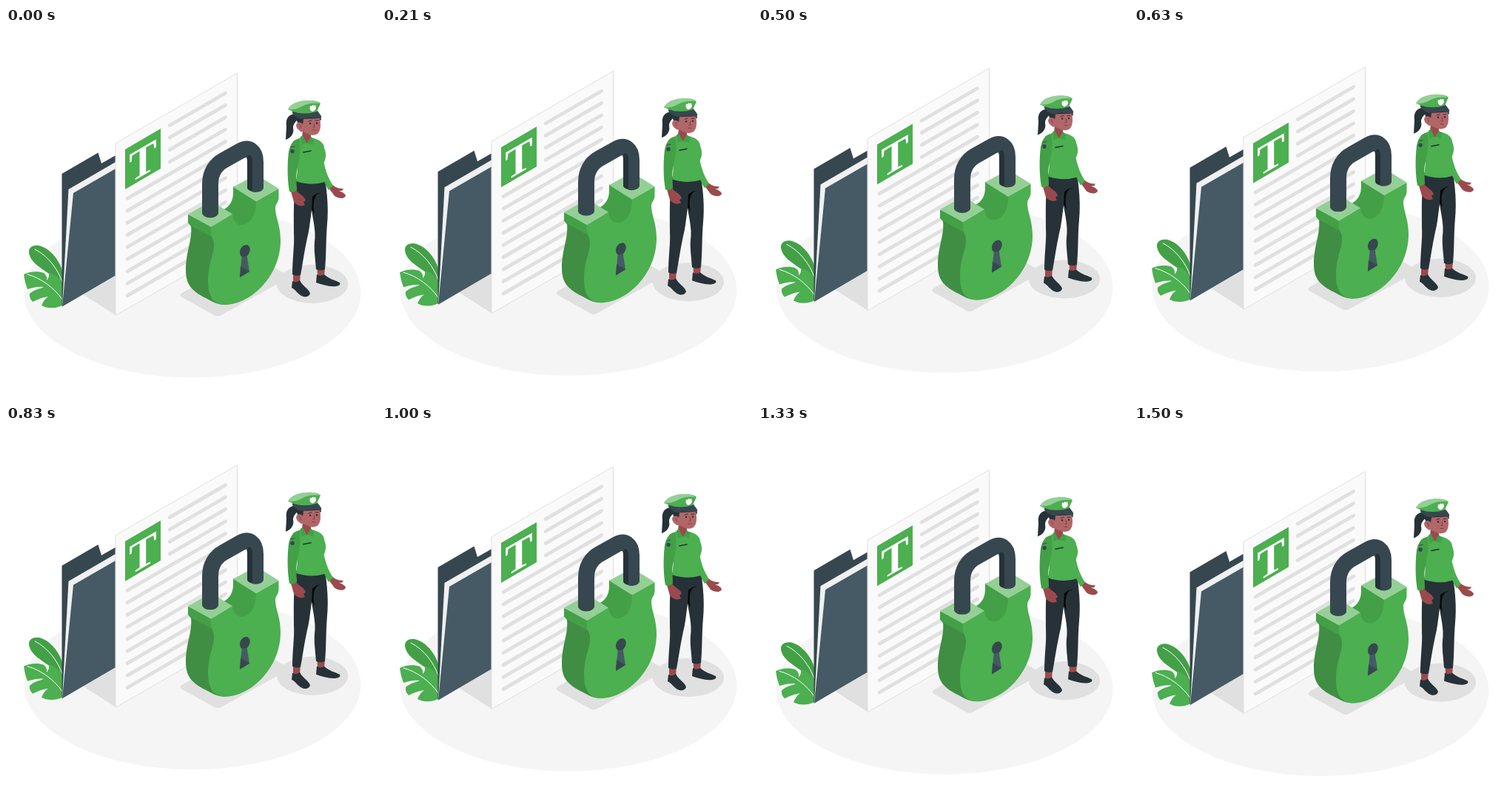
Recreate the animation shown at these times as an HTML page. Size 500x500 px, loop 1.54 s.

```html
<!DOCTYPE html>
<html lang="en">
<head>
<meta charset="utf-8">
<title>Document protection</title>
<style>
  html, body { margin: 0; width: 100%; height: 100%; overflow: hidden; background: #fff; }
  svg { display: block; width: 100%; height: 100%; }
  .green { fill: #4caf50; }
  .mid { fill: #43a047; }
  .deep { fill: #3f8e43; }
  .light { fill: #94cf96; }
  .slate { fill: #37474f; }
  .steel { fill: #455a64; }
  .ink { fill: #263238; }
  .shade { fill: #e0e0e0; }
  .skin { fill: #b16668; }
  .hand { fill: #9a4a4d; }
  .line { fill: none; stroke-linecap: round; stroke-linejoin: round; }
</style>
</head>
<body>
<svg viewBox="0 0 500 500">
<g id="scene">
  <ellipse cx="252" cy="357.5" rx="227.5" ry="115" fill="#f5f5f5"/>
  <g class="shade">
    <path d="M104 360L148 388V330Z"/>
    <path d="M238 358L330 305L379 333Q383 336 379 339L291 388Q286 391 281 388L238 364Q233 361 238 358Z"/>
    <ellipse cx="414" cy="346" rx="48" ry="26"/>
  </g>

  <g id="plant">
    <path class="mid" d="M31 304C30 297 36 293 44 294C60 297 75 317 77 332V348C72 343 66 337 58 332C45 323 33 316 31 304Z"/>
    <path class="green" d="M24 333C31 329 43 328 51 331Q56 335 55 341Q59 337 58 331C66 332 74 339 77 347V374C68 380 55 379 48 375Q51 367 57 363C49 364 42 367 36 370Q31 365 32 359C39 353 47 352 51 350C43 349 36 351 29 353Q25 343 24 333Z"/>
    <path class="line" stroke="#fff" d="M39 299C57 308 70 326 76 343M29 333C48 338 66 352 76 367"/>
  </g>

  <g id="folder">
    <path class="slate" d="M75.500 197L124.500 168.500L129 183L150 171V333L75.500 376Z"/>
    <path fill="#f0f0f0" d="M84.500 218L150 180V330L76 376Z"/>
    <path class="steel" d="M91 223L150 189V333L76 376.500Z"/>
  </g>

  <g id="page">
    <path fill="#fafafa" stroke="#e0e0e0" d="M148 156L312.500 61V294L148 388.500Z"/>
    <path class="green" d="M161 164L209 136V190L161 218Z"/>
    <text transform="matrix(.95 -.55 0 1 185 199.500)" text-anchor="middle" font-family="'Liberation Serif', serif" font-weight="700" font-size="59" fill="#fff">T</text>
    <path id="rows" class="line" stroke="#e0e0e0" stroke-width="4.800"/>
  </g>

  <g id="lock">
    <path class="deep" d="M246 252L277 269L300 360L296 374C286 374 279 370 270 365C250 355 243 346 243 327C243 302 252 287 250 268L246 263Z"/>
    <path class="mid" d="M246 252L277 268V282L250 267L246 263Z"/>
    <path class="mid" d="M307 214L340 232V260L318 275L304 265L293 246C303 241 307 233 307 222Z"/>
    <path class="green" d="M277 268L306 251.500C307 260 311 267 320 266C332 264 338 251 338 234L368.500 217V230C368 236 364 238 364 243C364 256 371 266 371 287C371 336 330 374 296 374C279 373 273 362 273 342C273 318 281 307 281 293C281 284 277 284 277 278Z"/>
    <path class="light" d="M246 251.500L277 234L306 251.500L277 269ZM307 215L338 198L368.500 217L338 234.500Z"/>
    <path class="line" stroke="#37474f" stroke-width="22" stroke-linecap="butt" style="stroke-linecap:butt" d="M276 251V211C276 196 283 185 294 179L317 166C328 160 337 166 337 181V216"/>
    <path class="ink" d="M326 177Q326 172 330 172Q333 174 333 181V221Q326 219 326 216Z"/>
    <path class="slate" d="M265 250H287A11 6.500 0 0 1 265 250ZM333 215H348A11 6.500 0 0 1 333 221.500Z"/>
    <path class="steel" d="M319 305L316 337L329 329L325 304Z"/>
    <path class="slate" d="M316 337L317 322L329 329Z"/>
    <path class="slate" d="M316 303C316 297 321 293 325 293C330 294 331 300 328 305L326 308L319 309Q316 308 316 303Z"/>
  </g>

  <g id="officer">
    <path class="hand" d="M388 331H398L397 344H388ZM420.500 325H431L430 335H421Z"/>
    <path class="ink" d="M387 342Q392 345 397 341C400 348 410 353 411 359Q409 364 402 363C395 361 392 354 386 351ZM420 333Q425 336 430 333C436 339 445 341 451 344Q453 348 446 349C437 350 428 347 419 344Z"/>
    <path class="ink" d="M392 204H431C434 222 436 245 434 265C432 288 433 307 431 326Q425 329 419 326C418 312 416 300 417 289C419 275 415 260 413 246C411 260 410 273 407 284C403 302 401 318 398 334Q392 336 387 333C387 312 390 293 389 278C389 255 388 230 392 204Z"/>
    <path fill="#050708" d="M426 222Q417 224 414 228L413 245L417 251C414 239 416 230 420 225Z"/>

    <path class="hand" d="M436 216L441 212C446 216 450 217 456 217L454 220L450 220C455 222 459 224 459 227C456 232 449 230 444 227ZM385 221L392 219C396 225 403 226 405 233L402 235L404 239C399 242 393 240 389 235Z"/>
    <path class="green" d="M429 178C431 192 436 204 442 213L436 219C431 212 427 200 426 188Z"/>
    <path class="green" d="M388 153L400 147L416 149C426 152 430 157 430 162C433 169 433 176 429 183C428 193 432 199 431 208Q412 214 392 207C394 194 394 189 392 182Z"/>
    <path class="mid" d="M396 150C388 150 384 158 382 167C380 184 380 205 383 221Q388 223 393 219C393 207 391 200 394 188C397 177 399 155 396 150Z"/>
    <circle class="slate" cx="387" cy="166.500" r="2.800"/>
    <path class="line" stroke="#37474f" d="M385 161L390 160"/>
    <path class="line" stroke="#263238" stroke-width="1.500" d="M402 168L412 166"/>

    <path class="hand" d="M401 138H412V149L407 156L400 148Z"/>
    <path class="mid" d="M398 147L401 145L406 155L400 158ZM412 147L416 150L415 158L407 155Z"/>
    <path class="ink" d="M389 116C380 118 378 124 379 133L378 151C384 149 390 143 388 135C388 130 391 127 393 125L398 140L406 138L426 124L424 116L398 114Z"/>
    <path class="skin" d="M402 123L424 122C426 132 425 139 421 143Q416 146 410 144L401 140C399 140 393 138 392 132C392 127 398 126 401 130Z"/>
    <path class="line" stroke="#7d3a3f" stroke-width=".9" d="M396 130Q399 132 398 135M416 129L417 134L415 134M414 138L418 138"/>
    <path class="line" stroke="#263238" stroke-width=".9" d="M409 126L413 125M418 125L422 125"/>
    <circle class="ink" cx="411" cy="129" r="1.200"/><circle class="ink" cx="420" cy="128.500" r="1.200"/>

    <path class="slate" d="M387 110L421 112L426 119Q427 123 422 122C412 120 405 122 399 123Q390 120 387 115Z"/>
    <path class="green" d="M381 110C386 102 398 98 410 98Q421 98 425 102L420 113Q403 118 388 113Z"/>
    <path class="light" d="M381 110C384 102 398 97 411 98C416 98 421 100 424 102C411 100 403 104 396 108Q388 111 381 110Z"/>
    <path fill="#fff" d="M411 105L413 106L414 104L416 105L418 104L419 108Q418 112 414 113Q411 112 410.500 109Z"/>
  </g>
</g>
</svg>
<script>
  const scene = document.getElementById('scene');
  const period = 1540, lift = 10;

  // Text rows: four short ones beside the heading, nine across the page.
  let rows = '';
  for (let i = 0; i < 13; i++) {
    const end = 88 + i * 16.4;
    const width = i < 4 ? 75.5 : 132.5;
    rows += `M296.500 ${end}L${296.5 - width} ${end + width * .58}`;
  }
  document.getElementById('rows').setAttribute('d', rows);

  // Linear float up and back down.
  function draw() {
    const phase = (performance.now() + 40) % period / (period / 2);
    const y = .5 - lift * (1 - Math.abs(1 - phase));
    scene.setAttribute('transform', `translate(0 ${y})`);
    requestAnimationFrame(draw);
  }
  draw();
</script>
</body>
</html>
```
